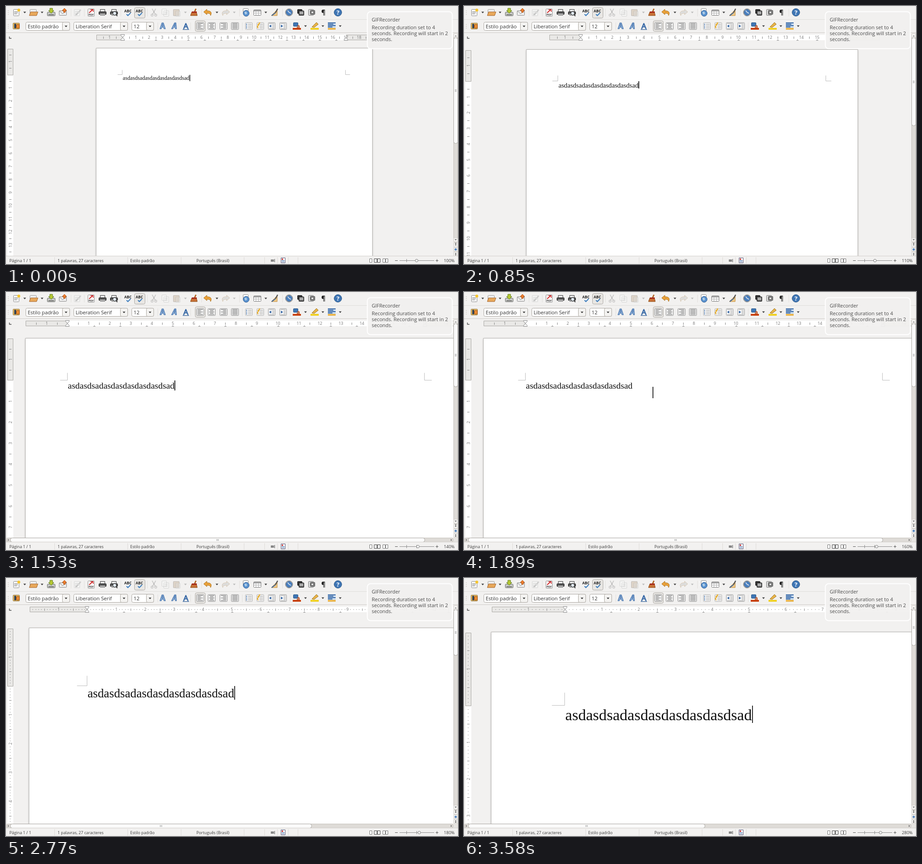
An HTML page with a canvas for the animation above (3.79 s loop, 990x566 px).

```html
<!DOCTYPE html>
<html lang="pt-BR">
<head>
<meta charset="utf-8">
<title>Zoom</title>
<style>
html, body { margin: 0; width: 100%; height: 100%; overflow: hidden; background: #f2f1f0; }
canvas { display: block; }
</style>
</head>
<body>
<canvas id="stage" width="990" height="566"></canvas>
<script>
const ctx = document.getElementById('stage').getContext('2d');
const W = 990, H = 566, LOOP = 3790, CM = 0.2876;
const UI = '"Open Sans", "Noto Sans", sans-serif';
const SERIF = '"Liberation Serif", serif';
const BG = '#f2f1f0', INK = '#3c3c3c', BLUE = '#3465a4';
const TYPED = 'asdasdsadasdasdasdasdasdsad';

// caret moves, page redraws, everything settled, zoom
const STEPS = [
  [0, 0, 0, 100], [560, 560, 560, 110], [800, 800, 850, 120],
  [1130, 1170, 1210, 140], [1450, 1490, 1570, 160], [1800, 1930, 1970, 180],
  [2410, 2450, 2500, 200], [2690, 2730, 2770, 220],
  [2970, 3010, 3050, 250], [3300, 3340, 3380, 280]
];
const LABELS = [[0, 100], [800, 110], [1130, 120], [1450, 140], [1800, 160],
  [2170, 180], [2970, 220], [3300, 250], [3580, 280]];

function rect(x, y, w, h, fill) {
  ctx.fillStyle = fill;
  ctx.fillRect(x, y, w, h);
}

function box(x, y, w, h, fill, stroke, r = 0, lw = 1) {
  ctx.beginPath();
  ctx.roundRect(x + 0.5, y + 0.5, w - 1, h - 1, r);
  if (fill) { ctx.fillStyle = fill; ctx.fill(); }
  if (stroke) { ctx.strokeStyle = stroke; ctx.lineWidth = lw; ctx.stroke(); }
}

function path(pts, color, lw = 1, fill) {
  ctx.beginPath();
  for (let i = 0; i < pts.length; i += 2) ctx.lineTo(pts[i], pts[i + 1]);
  if (fill) { ctx.closePath(); ctx.fillStyle = fill; ctx.fill(); }
  if (color) { ctx.strokeStyle = color; ctx.lineWidth = lw; ctx.stroke(); }
}

function disc(x, y, r, fill, stroke, lw = 1) {
  ctx.beginPath();
  ctx.arc(x, y, r, 0, 7);
  if (fill) { ctx.fillStyle = fill; ctx.fill(); }
  if (stroke) { ctx.strokeStyle = stroke; ctx.lineWidth = lw; ctx.stroke(); }
}

function text(s, x, y, size, color = INK, align = 'left', font = UI, style = '') {
  ctx.font = `${style} ${size}px ${font}`;
  ctx.textAlign = align;
  ctx.fillStyle = color;
  ctx.fillText(s, x, y);
}

function at(x, y, draw) {
  ctx.save();
  ctx.translate(x, y);
  draw();
  ctx.restore();
}

function dim(draw) {
  ctx.globalAlpha = 0.28;
  draw();
  ctx.globalAlpha = 1;
}

const arrow = (x, y, c = INK) => path([x - 3, y - 1.5, x + 3, y - 1.5, x, y + 2], null, 0, c);
const sheet = (x, y, w, h) => box(x, y, w, h, '#fff', '#888', 1);

function lines(x, y, widths, color = '#777', gap = 2.5) {
  widths.forEach((w, i) => rect(x, y + i * gap, w, 1, color));
}

function align(x, y, mode) {
  box(x - 8, y - 8, 17, 16, '#f7f7f7', '#8a8a8a', 1);
  for (let i = 0; i < 5; i++) {
    const w = mode < 3 && i % 2 ? 7 : 12;
    const off = [0, (12 - w) / 2, 12 - w, 0][mode];
    rect(x - 5.5 + off, y - 6 + i * 2.6, w, 1.2, '#777');
  }
}

function printer(x) {
  box(x - 5, 7, 11, 7, '#eee', '#333');
  box(x - 8, 12, 17, 7, '#555', '#222', 1);
  rect(x - 5, 17, 11, 5, '#ddd');
  rect(x - 5, 19, 11, 1, '#333');
}

function brush(x, y) {
  path([x + 4, y - 8, x + 1, y - 1], '#b46b2a', 3);
  path([x - 5, y - 1, x + 5, y - 1, x + 7, y + 7, x - 8, y + 7], '#8a4a10', 1, '#c87137');
  rect(x - 5, y - 2, 11, 3, '#a52a1a');
}

function curl(x, y, flip, color) {
  at(x, y, () => {
    ctx.scale(flip, 1);
    ctx.beginPath();
    ctx.moveTo(-9, -1);
    ctx.lineTo(-2, -7);
    ctx.lineTo(-2, -3.5);
    ctx.bezierCurveTo(6, -4, 10, 0, 6, 7);
    ctx.bezierCurveTo(6, 3, 3, 2, -2, 2);
    ctx.lineTo(-2, 5);
    ctx.closePath();
    ctx.fillStyle = color;
    ctx.fill();
    ctx.strokeStyle = '#a0620a';
    ctx.lineWidth = 0.8;
    ctx.stroke();
  });
}

function spell(x, tick) {
  text('ABC', x, 14, 8, '#222', 'center', UI, 'bold');
  path([x - 3, 18, x, 21, x + 6, 15], tick, 2.2);
}

function pencil(x, y, color) {
  path([x - 5, y + 5, x + 5, y - 6], color, 3);
  path([x - 7, y + 7, x - 4, y + 5, x - 6, y + 3], null, 0, '#444');
}

function toolbarTop() {
  const y = 14;
  sheet(16, 7, 13, 15);
  lines(18, 12, [8, 8, 6]);
  disc(28, 9, 3.2, '#f4c430');
  box(52, 7, 15, 13, '#eee', '#999', 1);
  path([51, 21, 54, 13, 70, 13, 67, 21], '#a3622c', 1, '#e8a85a');
  box(90, 13, 18, 9, '#c9cbc6', '#666', 1);
  rect(93, 18, 12, 2, '#777');
  path([96, 5, 102, 5, 102, 10, 105, 10, 99, 16, 93, 10, 96, 10], '#5b7a1a', 1, '#b7c832');
  box(116, 10, 17, 11, '#eee', '#888', 1);
  path([117, 11, 124, 17, 132, 11], '#888');
  path([126, 14, 126, 10, 123, 10, 128, 5, 133, 10, 130, 10, 130, 14], '#a04000', 0.8, '#f08030');
  dim(() => { sheet(149, 7, 13, 15); lines(151, 11, [8, 7, 8, 6]); pencil(159, 14, '#888'); });
  sheet(179, 6, 15, 17);
  path([182, 15, 190, 8], '#c22', 2);
  path([185, 8, 191, 8, 191, 13], '#c22', 1.5);
  text('PDF', 186.5, 21, 6, '#333', 'center', UI, 'bold');
  printer(211);
  printer(236);
  disc(238, 16, 4, '#dfe8f0', '#333', 1.3);
  path([241, 19, 244, 22], '#333', 2);
  spell(267, '#3f7fbf');
  box(281, 3, 24, 24, '#e9e7e4', '#a9a6a1', 3);
  spell(292, '#3f7fbf');
  dim(() => {
    path([320, 6, 327, 18], '#555', 1.5);
    path([328, 6, 321, 18], '#555', 1.5);
    disc(320, 20, 2.3, null, '#555', 1.4);
    disc(328, 20, 2.3, null, '#555', 1.4);
    sheet(341, 6, 11, 13);
    sheet(345, 10, 12, 13);
    lines(347, 13, [7, 7, 7]);
    box(366, 7, 14, 15, '#a8855c', '#666', 1);
    sheet(371, 11, 11, 12);
    lines(373, 14, [6, 6, 6]);
    curl(481, y, -1, '#aaa');
  });
  brush(412, y);
  curl(442, y, 1, '#e9a13b');
  sheet(519, 5, 12, 13);
  disc(526, 16, 6.5, '#5b93cf', '#2b5a92');
  path([522, 14, 526, 12, 528, 16, 525, 19], null, 0, '#b5d0e6');
  box(542, 8, 17, 13, '#fff', '#777', 1);
  rect(543, 9, 15, 3, '#aaa');
  path([542, 15.5, 558, 15.5], '#aaa');
  path([547.5, 9, 547.5, 20], '#aaa');
  path([553.5, 9, 553.5, 20], '#aaa');
  path([581, 21, 594, 8, 594, 21], '#c08a3a', 1, '#f0c987');
  path([595, 6, 590, 15], '#555', 2.5);
  path([582, 21, 590, 15], BLUE, 2);
  disc(620, y, 8, '#c9cbc8', '#777', 1);
  disc(620, y, 6.3, '#4a80c0', '#2f5c94');
  path([617, 10, 620, 14, 624, 16], '#eee', 1.4);
  box(638, 7, 11, 10, '#333', '#222', 1);
  box(641, 10, 12, 11, '#555', '#222', 1);
  rect(643, 12, 8, 6, '#aaa');
  box(662, 7, 12, 14, '#ddd', '#777', 1);
  box(666, 9, 11, 10, '#888', '#555', 1);
  disc(671, 14, 3, '#ddd', '#444');
  text('¶', 695, 19, 14, '#222', 'center', UI, 'bold');
  disc(727, y, 8.3, '#3f76b5', '#285584');
  text('?', 727, 19, 13, '#fff', 'center', UI, 'bold');
  [41, 79, 462, 569].forEach(x => arrow(x, y));
  [393, 500].forEach(x => arrow(x, y, '#bbb'));
  [142, 171, 251, 309, 428, 511, 605, 711].forEach(x => rect(x, 6, 1, 17, '#e2e0dd'));
}

function combo(x, w, label) {
  box(x, 35, w, 19, '#fff', '#aaa6a0', 3);
  box(x + w - 17, 35, 17, 19, '#f4f3f1', '#aaa6a0', 3);
  arrow(x + w - 8.5, 44.5);
  text(label, x + 4.5, 48.5, 11.2, '#333');
}

function listIcon(x, color) {
  box(x - 8, 36, 16, 16, '#f8f8f8', '#aaa', 1);
  for (let i = 0; i < 3; i++) {
    rect(x - 6, 39 + i * 4, 2, 2, color);
    rect(x - 2, 39.5 + i * 4, 8, 1, '#888');
  }
}

function indentIcon(x, dir) {
  box(x - 8, 36, 16, 16, '#f8f8f8', '#999', 1);
  lines(x - 6, 38, [12, 0, 0, 0, 12], '#999', 2.8);
  lines(x + 1, 41, [5, 5, 5], '#999', 2.8);
  path([x - 3 + 3 * dir, 44, x - 3 - 2 * dir, 41, x - 3 - 2 * dir, 47], null, 0, BLUE);
}

function letter(x, style, under) {
  text('A', x, 50, 17, '#a9c6e8', 'center', UI, style);
  ctx.strokeStyle = '#3a6aa6';
  ctx.lineWidth = 1.2;
  ctx.strokeText('A', x, 50);
  if (under) rect(x - 7, 51, 14, 1.2, '#315f98');
}

function toolbarFormat() {
  const y = 44;
  box(15, 37, 15, 14, '#f0c36a', '#8a6a30', 1);
  rect(18, 39, 4, 10, '#345');
  box(22, 40, 8, 9, '#e98a34', '#8a4a10', 1);
  combo(43, 97, 'Estilo padrão');
  combo(148, 119, 'Liberation Serif');
  combo(275, 49, '12');
  letter(343, 'bold');
  letter(369, 'italic bold');
  letter(394, '', true);
  box(414, 32, 23, 24, '#e9e7e4', '#a9a6a1', 3);
  [425, 450, 476, 501].forEach((x, i) => align(x, y, i));
  listIcon(532, BLUE);
  listIcon(557, '#e0a020');
  path([550, 47, 556, 36], '#e8b030', 2.5);
  indentIcon(582, -1);
  indentIcon(607, 1);
  box(629, 36, 11, 9, '#3f76b5', '#285584', 1);
  rect(628, 48, 18, 4, '#c9400c');
  text('a', 640, 49, 12, '#b7410e', 'center', UI, 'bold');
  path([670, 46, 680, 36, 684, 40, 675, 47], '#9a7422', 1, '#e9b44a');
  rect(667, 48, 18, 4, '#f0d020');
  rect(705, 36, 17, 12, '#c9dcf0');
  lines(705, 36, [17, 12, 17, 10], BLUE, 3);
  lines(705, 37, [17, 12, 17, 10], BLUE, 3);
  rect(705, 48, 17, 4, '#e9b44a');
  [656, 694, 732].forEach(x => arrow(x, y));
  [332, 404, 517, 622].forEach(x => rect(x, 36, 1, 17, '#e2e0dd'));
}

function toolbars() {
  rect(0, 0, W, 60, BG);
  rect(0, 29, W, 1, '#dfddda');
  rect(0, 58, W, 1, '#cfccc8');
  for (const y of [10, 14, 18, 40, 44, 48]) rect(4, y, 2, 1, '#c4c0bb');
  toolbarTop();
  toolbarFormat();
}

const cmOf = z => z * CM;
const pageLeft = z => z < 160 ? 499.5 - 10.5 * cmOf(z) : 19.7 + cmOf(z) / 2;
const pageTop = z => 78.6 + cmOf(z) / 2;
const floorOf = z => z < 160 ? 548 : 539;

function page(z) {
  const cm = cmOf(z), x = Math.round(pageLeft(z)), y = Math.round(pageTop(z));
  const w = Math.round(21 * cm), h = 29.7 * cm;
  ctx.save();
  ctx.shadowColor = 'rgba(0,0,0,.35)';
  ctx.shadowBlur = 4;
  ctx.shadowOffsetY = 1;
  rect(x, y, w, h, '#fff');
  ctx.restore();
  box(x - 1, y - 1, w + 2, h + 2, null, '#b5b3b0');
}

function corner(x, y, len, dir) {
  path([x, y - len, x, y, x - dir * len, y], '#bdbdbd');
}

function content(z) {
  const cm = cmOf(z), left = pageLeft(z) + 2 * cm, top = pageTop(z) + 2 * cm;
  const size = z * 0.1217, cx = Math.round(left) - 0.5, cy = Math.round(top + 0.2) - 0.5;
  corner(cx, cy, z * 0.1, 1);
  corner(Math.round(left + 17 * cm) - 0.5, cy, z * 0.1, -1);
  text(TYPED, left + 0.8, top + size * 0.93 + 0.5, size, '#111', 'left', SERIF);
}

function caret(z) {
  const cm = cmOf(z);
  const x = Math.ceil(pageLeft(z) + 2 * cm + z * 1.4604 + 0.2);
  rect(x, Math.round(pageTop(z) + 2 * cm + 0.4), z < 110 ? 1.3 : 1.6, Math.round(z * 0.137), '#000');
}

function marks(start, end, cm, put) {
  const n = cm > 54 ? 10 : 2;
  for (let i = -2 * n; i * cm / n + start < end; i++) {
    if (i === 0 || i === -2 * n) continue;
    put(start + i * cm / n, i % n ? 0 : Math.abs(i / n), i % (n / 2) === 0);
  }
}

function rulerAcross(z, prev) {
  const cm = cmOf(z), shifted = z > 100 && z < 160;
  const left = shifted ? pageLeft(prev) + 19.4 : pageLeft(z) + 0.6;
  const zero = left + 2 * cm, end = zero + 17 * cm;
  rect(zero, 63, 17 * cm, 12, '#fff');
  box(Math.round(left), 63, Math.round(2 * cm), 12, '#e9e8e6', '#aaa8a4');
  box(Math.round(end), 63, Math.round(2 * cm), 12, '#e9e8e6', '#aaa8a4');
  marks(zero, end + 2 * cm, cm, (x, n, half) => {
    if (n) text(n, x, 72.4, 8.8, '#777', 'center');
    else rect(Math.round(x), half ? 67 : 68.5, 1, half ? 5 : 1.5, '#888');
  });
  for (let x = zero + 1.25 * cm; x < end; x += 1.25 * cm) {
    const tx = Math.round(x);
    rect(tx - 2, 75, 5, 1, '#999');
    rect(tx, 73, 1, 2, '#999');
  }
  const m = Math.round(zero) - 0.5;
  path([m - 4, 62.5, m + 4, 62.5, m + 4, 64.5, m, 69, m - 4, 64.5, m - 4, 62.5], '#888', 1, '#f6f6f6');
  path([m - 4, 75.5, m + 4, 75.5, m + 4, 73.5, m, 69, m - 4, 73.5, m - 4, 75.5], '#888', 1, '#f6f6f6');
  path([end - 4, 75.5, end + 4, 75.5, end + 4, 73.5, end, 69, end - 4, 73.5, end - 4, 75.5], '#888', 1, '#f6f6f6');
}

function rulerDown(z) {
  const cm = cmOf(z), top = Math.round(pageTop(z) + 0.8), zero = pageTop(z) + 2 * cm;
  const end = floorOf(z);
  rect(3, zero, 13, end - zero, '#fff');
  box(3, top, 13, Math.round(2 * cm), '#e9e8e6', '#aaa8a4');
  marks(zero, end + 4, cm, (y, n, half) => {
    if (!n) return rect(half ? 7 : 8.5, Math.round(y), half ? 5 : 1.5, 1, '#888');
    at(12.8, y, () => {
      ctx.rotate(-Math.PI / 2);
      text(n, 0, 0, 8.8, '#777', 'center');
    });
  });
}

function bars(z, doneZ) {
  const low = z < 160 ? 513 : 503;
  rect(980, 60, 10, 488, '#e6e4e1');
  box(980, 60, 10, low - 54, '#dedbd7', '#c5c1bc', 4);
  box(980, 60, 10, 10, '#f5f4f2', '#d0cdc9', 2);
  const h = (z < 160 ? 23300 : 22300) / z;
  box(980, 69, 10, h, '#fafafa', '#a9a6a1', 4);
  for (let i = -1; i < 2; i++) rect(983, Math.round(68.5 + h / 2) + i * 2, 4, 1, '#aaa');
  path([982.5, 67, 987.5, 67, 985, 64], null, 0, '#999');
  box(980, low - 5, 10, 10, '#f5f4f2', '#d0cdc9', 2);
  path([982.5, low - 1.5, 987.5, low - 1.5, 985, low + 1.5], null, 0, '#777');
  for (let i = 0; i < 3; i++) {
    const y = low + 6 + i * 10;
    box(980, y, 10, 10, '#f5f4f2', '#d0cdc9', 2);
    if (i === 1) disc(985, y + 5, 2.6, '#5b88bd');
    else {
      const d = i ? 1 : -1;
      for (const s of [-1, 2]) path([983, y + 4 + s, 987, y + 4 + s, 985, y + 4 + s + 2.5 * d], null, 0, '#555');
    }
  }
  if (z < 160) return;
  rect(0, 539, 981, 10, '#e6e4e1');
  box(1, 539, 979, 10, '#dedbd7', '#c5c1bc', 4);
  const w = 145400 / Math.max(160, doneZ);
  box(9, 539, w, 10, '#fafafa', '#a9a6a1', 4);
  for (let i = -1; i < 2; i++) rect(Math.round(8.5 + w / 2) + i * 2, 542, 1, 4, '#aaa');
  path([6, 541.5, 6, 546.5, 3.5, 544], null, 0, '#777');
  path([974, 541.5, 974, 546.5, 977, 544], null, 0, '#777');
}

function status(label) {
  const y = 561.5, s = 8.8;
  rect(0, 548, W, 18, BG);
  rect(0, 548, W, 1, '#d3d0cc');
  text('Página 1 / 1', 7.5, y, s);
  text('1 palavras, 27 caracteres', 113, y, s);
  text('Estilo padrão', 272, y, s);
  text('Português (Brasil)', 417, y, s);
  [106, 266, 383, 521, 566, 594, 618, 639].forEach(x => rect(x, 551, 1, 14, '#dedbd8'));
  rect(580, 556, 7, 5, '#888');
  rect(588, 555, 1, 7, '#555');
  box(602, 552, 10, 12, '#fff', '#557');
  rect(604, 554, 3, 3, '#c33');
  lines(604, 558, [6, 6], BLUE);
  box(796, 554, 6, 9, '#fff', '#777');
  for (const x of [806, 813]) box(x, 554, 7, 9, '#fff', '#444');
  for (const x of [825, 831]) box(x, 554, 6, 9, '#fff', '#777');
  rect(852, 558, 6, 1, '#555');
  rect(941, 558, 6, 1, '#555');
  rect(943.5, 555.5, 1, 6, '#555');
  rect(862, 558, 76, 1, '#8a8a8a');
  rect(877, 555, 1, 7, '#8a8a8a');
  rect(899, 555, 1, 7, '#8a8a8a');
  disc(899.4 + (label - 100) * 0.072, 558.5, 3, '#fafafa', '#777');
  text(label + '%', 959, y, 9.3);
}

function notice() {
  ctx.globalAlpha = 0.94;
  box(791, 12, 187, 83, BG, null, 7);
  ctx.globalAlpha = 1;
  box(791, 12, 187, 82, null, '#fff', 7, 2);
  text('GIFRecorder', 801, 33.5, 10.8, '#4a4a4a');
  ['Recording duration set to 4', 'seconds. Recording will start in 2', 'seconds.']
    .forEach((s, i) => text(s, 801, 51 + i * 13, 11, '#4a4a4a'));
}

function draw(t) {
  const reached = k => STEPS.findLastIndex(s => s[k] <= t);
  const now = reached(1), z = STEPS[now][3];
  const prev = STEPS[Math.max(0, now - 1)][3];
  const next = STEPS[reached(0)][3], done = STEPS[reached(2)][3];
  rect(0, 0, W, H, BG);
  ctx.save();
  ctx.beginPath();
  ctx.rect(17, 78, 963, floorOf(z) - 78);
  ctx.clip();
  page(z);
  if (done !== z && done >= 160) {
    const x = Math.round(pageLeft(done));
    rect(x, 509, 40, 40, '#fff');
    rect(x - 1, 509, 1, 40, '#b5b3b0');
  }
  content(z);
  if (t < 40 || t >= 560) caret(next);
  ctx.restore();
  rulerAcross(z, prev);
  rulerDown(z);
  path([7.5, 67, 7.5, 71, 12, 71], '#555', 1.5);
  bars(z, done);
  status(LABELS.findLast(l => l[0] <= t)[1]);
  toolbars();
  notice();
}

const begin = performance.now();
function tick() {
  draw((performance.now() - begin) % LOOP);
  requestAnimationFrame(tick);
}
tick();
</script>
</body>
</html>
```
